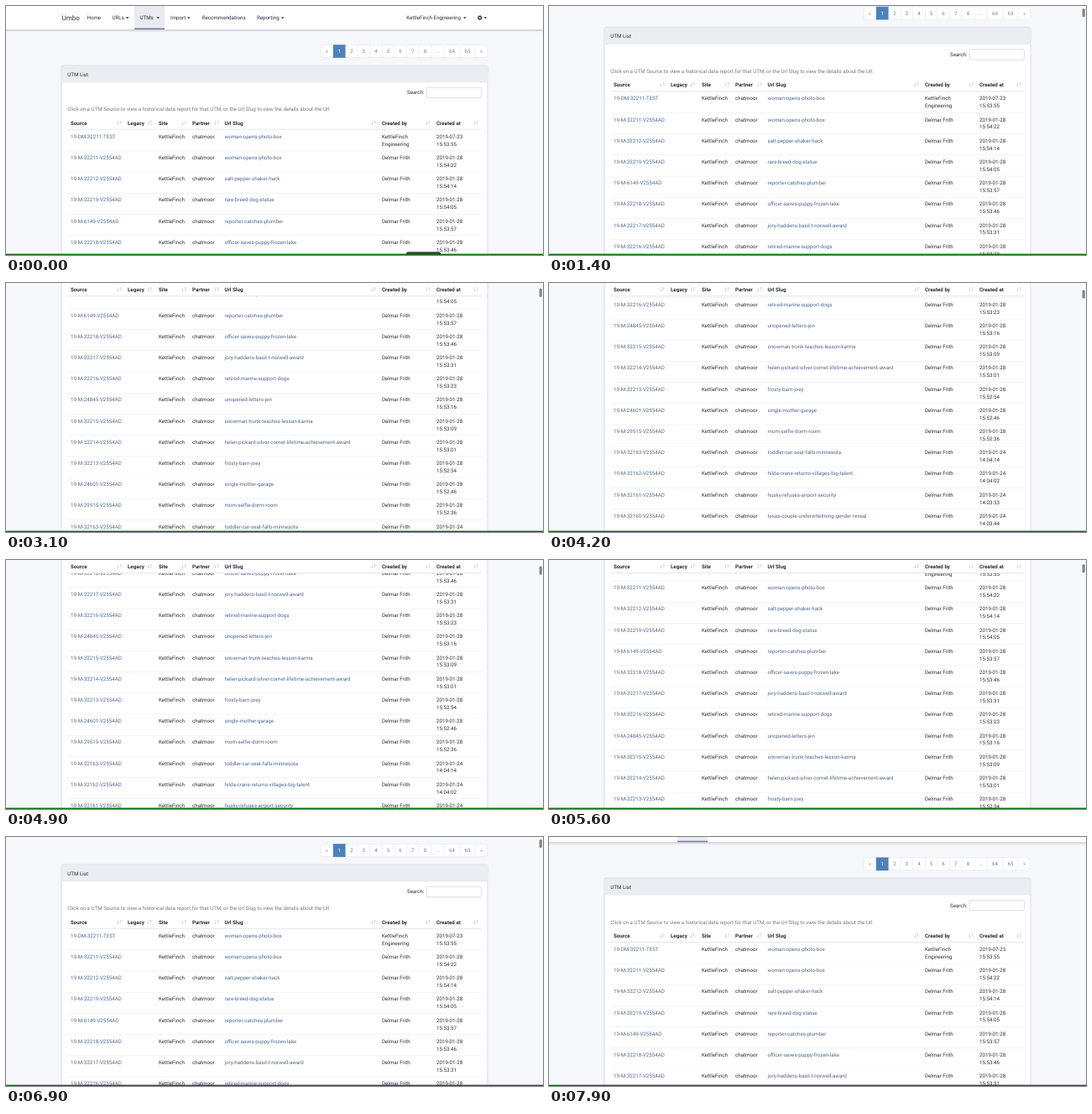
An HTML page for the animation above (8000 ms loop, 640 px wide and 297 px high).

```html
<!DOCTYPE html>
<html lang="en">
<head>
<meta charset="utf-8">
<title>UTM List</title>
<style>
  html, body { margin: 0; width: 100%; height: 100%; overflow: hidden; background: #f7f8fc; }
  svg { display: block; width: 100%; height: 100%; }
  text {
    font: 6.2px Roboto, Arial, sans-serif;
    fill: #2b2e33;
    text-rendering: geometricPrecision;
    white-space: pre;
  }
  .brand { font-size: 8px; }
  .head { font-weight: 700; }
  .link { fill: #50698a; }
  .soft { fill: #777; }
  .page { fill: #7c828a; text-anchor: middle; }
  .on { fill: #fff; }
  .end { text-anchor: end; }
  .rule { fill: #e6e8ec; }
  .nav { filter: drop-shadow(0 1px 1.6px rgba(40, 45, 70, .3)); }
  .panel { filter: drop-shadow(0 .4px 1.2px rgba(40, 45, 70, .22)); }
</style>
</head>
<body>
<svg id="stage" viewBox="0 0 640 297" preserveAspectRatio="none">
  <rect width="640" height="297" fill="#f7f8fc"/>
  <g id="page">
    <g id="pager"></g>
    <g class="panel">
      <rect x="66.3" y="71.5" width="507.4" height="900" rx="1.5" fill="#fff" stroke="#dcdee5" stroke-width=".5"/>
    </g>
    <path d="M66.5 91V73q0-1.3 1.3-1.3H572.2q1.3 0 1.3 1.3V91z" fill="#ecedf2"/>
    <rect x="66.5" y="90.6" width="507" height=".5" fill="#dfe1e7"/>
    <rect x="501.2" y="97.2" width="65.2" height="12.3" rx="1" fill="#fff" stroke="#c9ccd2" stroke-width=".6"/>
    <g id="intro"></g>
    <g id="rows"></g>
    <g id="nav">
      <rect class="nav" x="-5" y="-6" width="650" height="34" fill="#fff"/>
      <rect x="153" width="36" height="28" fill="#e9ebf1"/>
      <rect x="153" y="26.4" width="36" height="1.6" fill="#7b839b"/>
      <g fill="none" stroke="#2b2e33">
        <circle cx="564.7" cy="14" r="1.65" stroke-width="1.3"/>
        <circle cx="564.7" cy="14" r="2.6" stroke-width=".8" stroke-dasharray="1.02 1.02"/>
      </g>
    </g>
  </g>
  <g id="head">
    <rect x="73" y="-9" width="493.5" height="17" fill="#fff"/>
    <rect x="73" y="7.5" width="493.5" height=".8" fill="#dfe2e7"/>
  </g>
  <rect id="thumb" x="635.6" width="3.2" height="10.4" rx="1.6" fill="#858585"/>
  <rect id="label" x="477" y="293.2" width="41" height="9" rx="2" fill="#3d3f40"/>
  <rect y="295.6" width="640" height="1.4" fill="#0c690f"/>
</svg>
<script>
const NS = 'http://www.w3.org/2000/svg';
const $ = id => document.getElementById(id);

function add(parent, tag, attrs) {
  const el = document.createElementNS(NS, tag);
  for (const k in attrs) el.setAttribute(k, attrs[k]);
  parent.appendChild(el);
  return el;
}

// y is the middle of the capital letters
function write(parent, str, x, y, cls = '') {
  const lift = cls === 'brand' ? 2.85 : 2.2;
  add(parent, 'text', { x, y: y + lift, class: cls }).textContent = str;
}

const caret = x => add($('nav'), 'path', { d: `M${x - 1.8} 13.3h3.6l-1.8 2z`, fill: '#2b2e33' });

const SITE = 'KettleFinch', PARTNER = 'chatmoor', AUTHOR = 'Delmar Frith';

// Navigation
write($('nav'), 'Umbo', 66.5, 14, 'brand');
[['Home', 96.5], ['URLs', 126.5], ['UTMs', 159.5], ['Import', 196],
 ['Recommendations', 233.7], ['Reporting', 299]].forEach(([s, x]) => write($('nav'), s, x, 14));
write($('nav'), SITE + ' Engineering', 542, 14, 'end');
[144.7, 181.2, 217.8, 329.7, 546.8, 571.3].forEach(caret);

// Pagination
const edges = [375.3, 389.8, 404.8, 419, 433.6, 448.2, 462.8, 477.4, 492, 507, 522, 541, 559, 573.7];
add($('pager'), 'rect', { x: 375.3, y: 46.4, width: 198.4, height: 15.2, rx: 1.5, fill: '#fff', stroke: '#dde0e5', 'stroke-width': .5 });
['«', '1', '2', '3', '4', '5', '6', '7', '8', '...', '64', '65', '»'].forEach((s, i) => {
  const x = edges[i], w = edges[i + 1] - x, on = i === 1;
  if (i) add($('pager'), 'rect', {
    x: x - (on ? 0 : .2), y: on ? 46.2 : 46.4, width: on ? w : .45, height: on ? 15.6 : 15.2,
    fill: on ? '#4b82b9' : '#dde0e5'
  });
  write($('pager'), s, x + w / 2, 54, on ? 'page on' : 'page');
});

// Panel texts
write($('intro'), 'UTM List', 73.3, 81.3);
write($('intro'), 'Search:', 478, 103.2);
write($('intro'), 'Click on a UTM Source to view a historical data report for that UTM, or the Url Slug to view the details about the Url.', 73.2, 123.2, 'soft');

// Table head with sort arrows
[['Source', 77, 135], ['Legacy', 145, 171], ['Site', 182, 212], ['Partner', 222, 251],
 ['Url Slug', 260.5, 438], ['Created by', 448, 503], ['Created at', 513, 560]].forEach(([s, x, a]) => {
  write($('head'), s, x, 0, 'head');
  add($('head'), 'path', {
    d: `M${a - 1.5} -2.2v4.4m-1.2 -1.3l1.2 1.3l1.2 -1.3M${a + 1.7} 2.2v-4.4m-1.2 1.3l1.2 -1.3l1.2 1.3`,
    fill: 'none', stroke: '#c3c6cb', 'stroke-width': .6
  });
});

// Table rows: code, slug, time
const ROW = 25.2;
const rows = `32211 woman-opens-photo-box 15:53:55
32211 woman-opens-photo-box 15:54:22
32212 salt-pepper-shaker-hack 15:54:14
32219 rare-breed-dog-statue 15:54:05
6149 reporter-catches-plumber 15:53:57
32218 officer-saves-puppy-frozen-lake 15:53:46
32217 jory-haddens-basil-t-norwell-award 15:53:31
32216 retired-marine-support-dogs 15:53:23
24845 unopened-letters-jen 15:53:16
32215 snowman-trunk-teaches-lesson-karma 15:53:09
32214 helen-pickard-silver-comet-lifetime-achievement-award 15:53:01
32213 frosty-barn-joey 15:52:54
24601 single-mother-garage 15:52:46
29515 mom-selfie-dorm-room 15:52:36
32163 toddler-car-seat-falls-minnesota 14:04:14
32162 hilda-crane-returns-villages-big-talent 14:04:02
32161 husky-refuses-airport-security 14:03:53
32160 texas-couple-underwhelming-gender-reveal 14:03:44`.split('\n');

rows.forEach((row, i) => {
  const [code, slug, time] = row.split(' ');
  const y = 155.6 + i * ROW, g = $('rows');
  const put = (s, x, dy = 0, cls) => write(g, s, x, y + dy, cls);
  put(i ? `19-M-${code}-V2554AD` : `19-DM-${code}-TEST`, 77, 0, 'link');
  put(SITE, 182);
  put(PARTNER, 222);
  put(slug, 260.5, 0, 'link');
  put(i ? AUTHOR : SITE, 448);
  if (!i) put('Engineering', 448, 8.9);
  put(i ? (i < 14 ? '2019-01-28' : '2019-01-24') : '2019-07-23', 513);
  put(time, 513, 8.9);
  add(g, 'rect', { x: 73, y: y + 17, width: 493.5, height: .5, class: 'rule' });
});

// Scroll position over time, joined by a monotone cubic
const keys = [[0, 0], [1000, 0], [1100, 6], [1500, 58], [1900, 94], [2300, 111], [2800, 181],
  [3100, 218], [3700, 278], [4200, 306.3], [4500, 311], [5000, 250], [5500, 151], [5600, 147.8],
  [5700, 147.8], [6100, 104], [6500, 66.6], [6900, 38], [7200, 21.8], [8000, 21.8]];
const slope = i => (keys[i + 1][1] - keys[i][1]) / (keys[i + 1][0] - keys[i][0]);
function tangent(i) {
  if (i === 0 || i === keys.length - 1) return 0;
  const a = slope(i - 1), b = slope(i);
  return a * b <= 0 ? 0 : 2 * a * b / (a + b);
}
function scrollAt(t) {
  let i = 0;
  while (t >= keys[i + 1][0]) i++;
  const [t0, p] = keys[i], [t1, q] = keys[i + 1];
  const d = t1 - t0, u = (t - t0) / d, v = 1 - u;
  return v * v * (1 + 2 * u) * p + u * u * (3 - 2 * u) * q
    + d * u * v * (v * tangent(i) - u * tangent(i + 1));
}

const LOOP = 8000, STEP = 100;
function draw(now) {
  const t = Math.floor(now % LOOP / STEP) * STEP;
  const s = scrollAt(t);
  $('page').setAttribute('transform', `translate(0 ${-s})`);
  $('head').setAttribute('transform', `translate(0 ${Math.max(139.3 - s, 7.6)})`);
  $('thumb').setAttribute('y', 2 + s * .02);
  $('thumb').setAttribute('opacity', t < 1100 ? 0 : Math.max(0, Math.min(1, (7900 - t) / 400)));
  $('label').setAttribute('opacity', t < 100 ? 1 : 0);
}
function tick() {
  draw(performance.now());
  requestAnimationFrame(tick);
}
tick();
</script>
</body>
</html>
```
